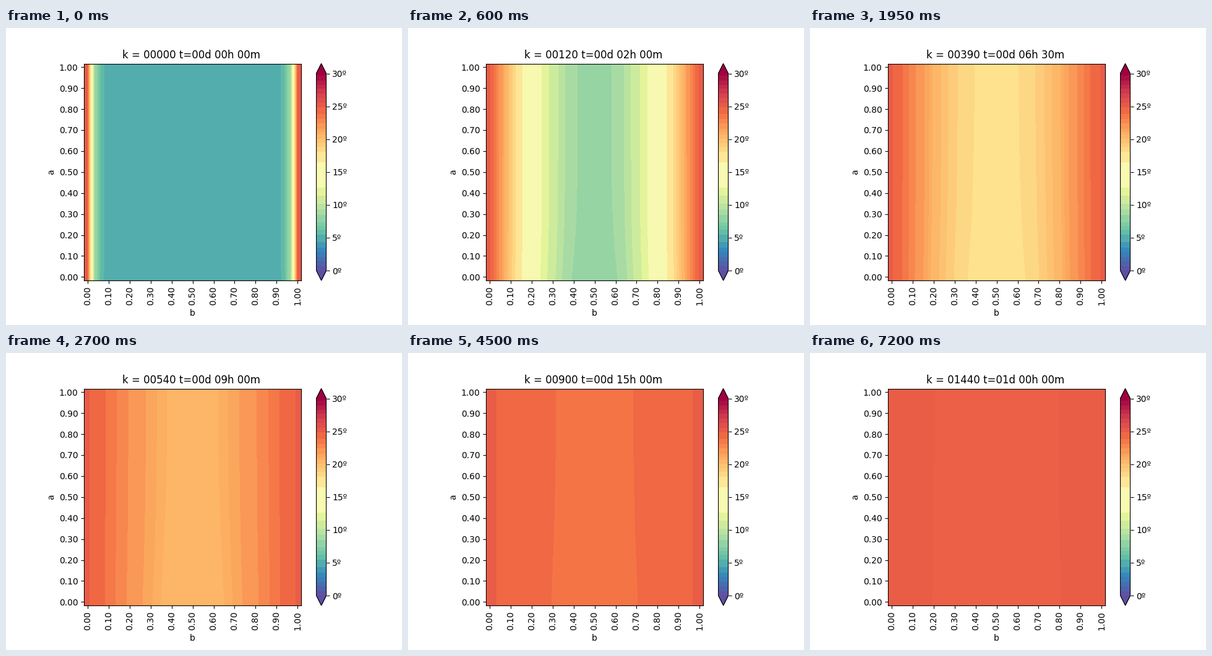
Animation, 640 px wide and 480 px high, one loop 7.35 s. Source, as a matplotlib script:

```python
import numpy as np
import matplotlib.pyplot as plt
from matplotlib.animation import FuncAnimation
from matplotlib.cm import ScalarMappable
from matplotlib.colors import ListedColormap, Normalize

N = 31              # grid nodes per side
FRAMES = 49
STEP = 30           # minutes between frames
WALL, START, TMAX = 25.0, 5.0, 30.0
DIFFUSION = 0.00321 / np.pi ** 2 * (N - 1) ** 2   # per minute, in grid units
LOSS = 0.1          # weak heat loss along the bottom edge
PIXELS = 350

# Edges of the flat colour bands, in degrees
CUTS = np.array([
    0.7, 1.4, 2.1, 2.8, 3.5, 4.3, 5.5, 6.2, 6.8, 7.4, 8.48, 9.43, 10.2,
    11.4, 12.6, 16.5, 18.1, 18.9, 19.5, 20.05, 20.8, 21.1, 21.53, 22.4,
    23.09, 23.79, 24.844, 25.5, 26.2, 26.9, 27.6, 28.3, 29.0, 29.6])
spectral = plt.get_cmap("Spectral_r")


def laplacian(n):
    return np.eye(n, k=1) + np.eye(n, k=-1) - 2 * np.eye(n)


def implicit(lap):
    return np.linalg.inv(np.eye(len(lap)) - DIFFUSION * lap)


lap_y = laplacian(N)
lap_y[0, 1] = lap_y[-1, -2] = 2
lap_y[0, 0] += 2 * LOSS / (N - 1)
step_x, step_y = implicit(laplacian(N - 2)), implicit(lap_y)

nodes = np.linspace(0, 1, N)
half = 0.5 / (N - 1)
fine = -half + (np.arange(PIXELS) + 0.5) / PIXELS * (1 + 2 * half)
# Linear interpolation from nodes to pixels, flat in the outer half cells
spread = np.array([np.interp(fine, nodes, row) for row in np.eye(N)]).T


def temperature(minute):
    gap = np.zeros((N, N))
    gap[:, 1:-1] = WALL - START
    power = np.linalg.matrix_power
    gap[:, 1:-1] = power(step_y, minute + 1) @ gap[:, 1:-1] @ power(step_x, minute + 1)
    return WALL - spread @ gap @ spread.T


def paint(temp):
    """Give every band the mean of the colours that fall into it."""
    band = np.digitize(temp, CUTS)
    flat = band.ravel()
    rgb = spectral(temp / TMAX)[..., :3].reshape(-1, 3)
    count = np.maximum(np.bincount(flat, minlength=len(CUTS) + 1), 1)
    sums = [np.bincount(flat, part, minlength=len(CUTS) + 1) for part in rgb.T]
    return (np.array(sums) / count).T[band]


def heading(minute):
    days, rest = divmod(minute, 1440)
    return f"k = {minute:05d} t={days:02d}d {rest // 60:02d}h {rest % 60:02d}m"


fig, ax = plt.subplots(figsize=(6.4, 4.8), dpi=100)
fig.subplots_adjust(left=0.125, right=0.9, top=0.88, bottom=0.15)
image = ax.imshow(paint(temperature(0)), origin="lower", interpolation="nearest",
                  extent=(-half, 1 + half, -half, 1 + half))
ticks = np.linspace(0, 1, 11)
labels = [f"{t:.2f}" for t in ticks]
ax.set_xticks(ticks, labels, rotation=90)
ax.set_yticks(ticks, labels)
ax.set_xlabel("b")
ax.set_ylabel("a")
title = ax.set_title(heading(0), x=0.494)

shades = (np.arange(256) + 0.5) / 256 * TMAX
banded = ListedColormap(paint(shades))
banded.set_extremes(under=spectral(0.0), over=spectral(1.0))
bar = fig.colorbar(ScalarMappable(Normalize(0, TMAX), banded), ax=ax,
                   extend="both", aspect=22)
degrees = range(0, 31, 5)
bar.set_ticks(list(degrees), labels=[f"{d}º" for d in degrees])


def update(i):
    minute = i * STEP
    image.set_data(paint(temperature(minute)))
    title.set_text(heading(minute))
    return image, title


anim = FuncAnimation(fig, update, frames=FRAMES, init_func=lambda: update(0),
                     interval=150, repeat=True, repeat_delay=0)
plt.show()
```
